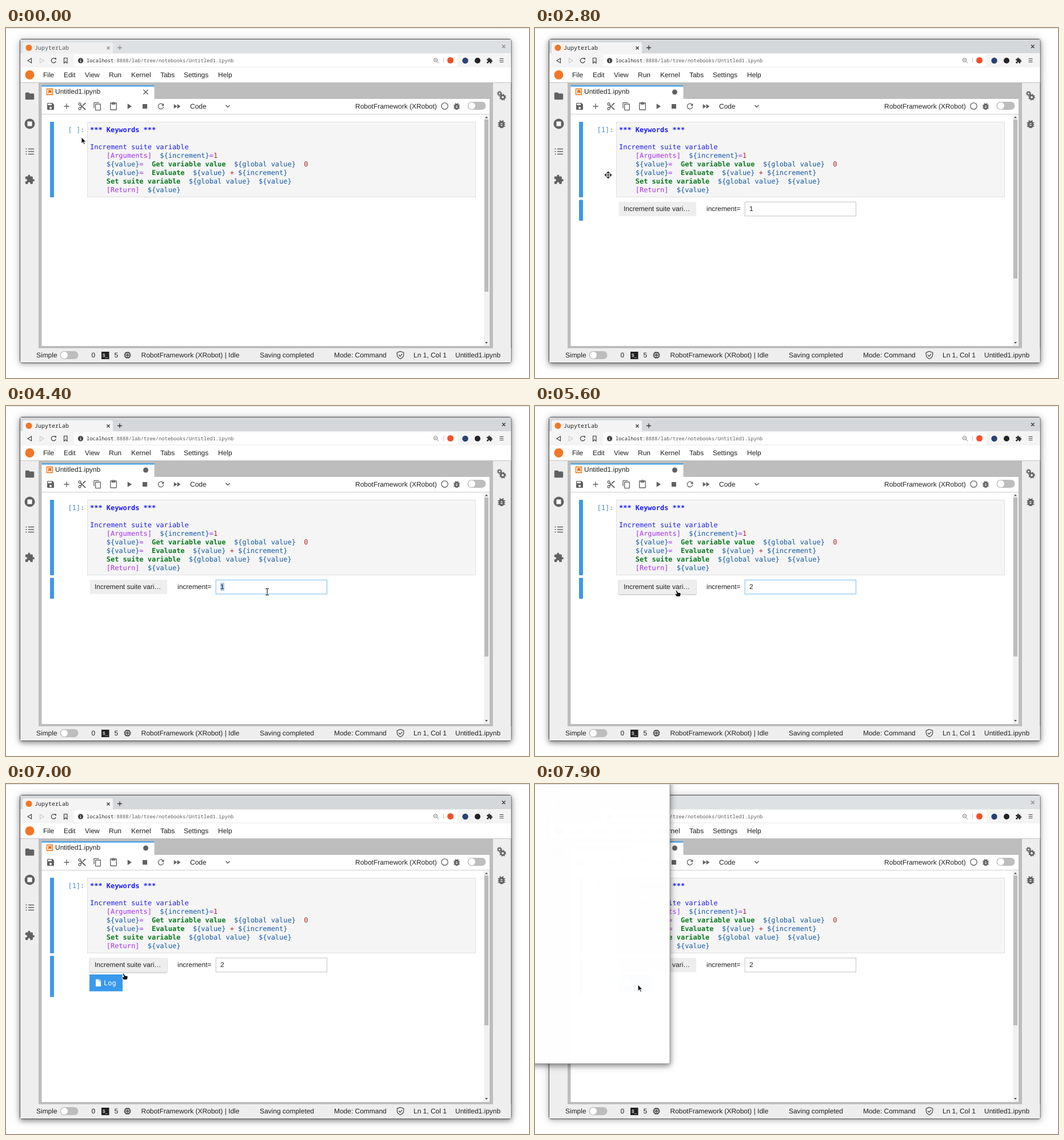
These frames come from a looping animation (915 px wide and 612 px high, 8000 ms). An HTML page:

```html
<!DOCTYPE html>
<html lang="en">
<head>
<meta charset="utf-8">
<title>Notebook widget demo</title>
<style>
html, body { margin: 0; width: 100%; height: 100%; overflow: hidden; background: #fff; }
svg { display: block; }
text { font: 11.96px "Liberation Sans", Arial, sans-serif; fill: #212121; white-space: pre; text-rendering: geometricPrecision; }
.code text, text.code { font-family: "DejaVu Sans Mono", monospace; }
text.chrome { font-family: "Noto Sans Mono", "DejaVu Sans Mono", monospace; }
.code .head { font-weight: bold; fill: #1a1aff; }
.code .name { fill: #2020e8; }
.code .meta { fill: #aa30f0; }
.code .var { fill: #1459a8; }
.code .key { font-weight: bold; fill: #0a7a1e; }
.code .lit { fill: #ba2121; }
.icon { fill: #616161; }
.line { fill: none; stroke: #424242; stroke-width: 1.2; }
.shade { filter: drop-shadow(0 3px 4.5px rgba(0,0,0,.36)) drop-shadow(0 1px 8px rgba(0,0,0,.2)); }
.shade.idle { filter: drop-shadow(0 2px 3px rgba(0,0,0,.2)) drop-shadow(0 1px 8px rgba(0,0,0,.2)); }
.lift { filter: drop-shadow(0 1px 1px rgba(0,0,0,.3)); }
#popup { filter: drop-shadow(0 3px 5px rgba(0,0,0,.4)) drop-shadow(0 1px 8px rgba(0,0,0,.2)); }
#cursor > g { display: none; }
</style>
</head>
<body>
<svg id="stage" width="915" height="612" viewBox="0 0 915 612">
  <!-- browser window -->
  <rect id="frame" class="shade" x="24.5" y="19.5" width="859.5" height="566" rx="3" fill="#eee" stroke="#4a4a4a"/>
  <rect id="titlebar" x="25" y="20" width="858.5" height="24"/>
  <path id="tab" d="M29 44V28q0-3 3-3H184q3 0 3 3V44z"/>
  <rect x="25" y="44" width="858.5" height="25" fill="#f4f4f4"/>
  <rect x="119" y="46" width="671" height="21" rx="3" fill="#fff"/>
  <circle cx="40" cy="34.5" r="5.5" fill="#f37726"/>
  <g id="controls">
    <text class="chrome" x="50" y="38" style="font-size:10px;font-weight:500;fill:inherit">JupyterLab</text>
    <path d="M176.5 32.5l5 5m0-5l-5 5M195 34.5h8m-4-4v8M868 29.500l5.500 5.500m0-5.500l-5.500 5.500" stroke-width="1.3"/>
  </g>
  <g class="line">
    <path d="M38 57l6.500-4v8z"/>
    <path d="M66 57l-6.500-4v8z" stroke="#ccc"/>
    <path d="M86.500 54.500a4 4 0 1 0 .7 3.500"/>
    <path d="M101.500 52.500h5.500v9l-2.750-2.500-2.750 2.500z"/>
    <path d="M863.500 53.500h7m-7 3h7m-7 3h7"/>
    <g stroke="#777" stroke-width="1">
      <circle cx="751.500" cy="56" r="3.200"/>
      <path d="M754 58.500l3 3M750 56h3"/>
    </g>
    <path d="M765.500 52v9" stroke="#ccc"/>
  </g>
  <path d="M84.500 52.500h3.500v3.500z" fill="#424242"/>
  <circle cx="130.500" cy="57" r="4.700" fill="#444"/>
  <path d="M130.500 54.300v1m0 1v3.400" stroke="#fff" stroke-width="1.200"/>
  <text class="chrome" x="141" y="60" style="font-size:8.750px;fill:#5c5c5c"><tspan fill="#222">localhost</tspan>:8888/lab/tree/notebooks/Untitled1.ipynb</text>
  <circle cx="777.500" cy="56.500" r="5.500" fill="#f4502a"/>
  <circle cx="803.500" cy="57" r="5.200" fill="#294172"/>
  <circle cx="825" cy="57" r="5" fill="#222"/>

  <!-- application shell -->
  <rect x="25" y="69" width="858.500" height="26" fill="#fff"/>
  <circle cx="41.500" cy="82" r="8" fill="#f37726"/>
  <g id="menu"></g>
  <rect x="57" y="95" width="795" height="465" fill="#bdbdbd"/>
  <rect x="25" y="95" width="858.500" height="1" fill="#c4c4c4"/>
  <rect x="62.500" y="101" width="197" height="24" fill="#fff"/>
  <rect x="62.500" y="100.500" width="197" height="1.800" fill="#2196f3"/>
  <rect x="62.500" y="124" width="783.500" height="432" fill="#fff"/>
  <rect x="62.500" y="150" width="783.500" height="1.300" fill="#d8d8d8"/>
  <path d="M71.500 106.500h10v10h-10z" fill="none" stroke="#ef6c00" stroke-width="1.300"/>
  <path d="M74 108.500h5.500v6.500l-2.750-2.500-2.750 2.500z" fill="#ef6c00"/>
  <text x="86" y="115">Untitled1.ipynb</text>
  <path id="close" d="M240.500 108l8 8m0-8l-8 8" stroke="#555" stroke-width="1.300"/>
  <circle id="dirty" cx="244.500" cy="112" r="4.500" fill="#616161"/>

  <g id="icons" class="icon"></g>
  <text x="322" y="141" fill="#111">Code</text>
  <path class="line" d="M384.500 135l3.500 3.500 3.500-3.500"/>
  <text x="611" y="141">RobotFramework (XRobot)</text>
  <circle id="kernel" cx="767.500" cy="136.500" r="5.700" fill="none" stroke="#616161" stroke-width="1.300"/>

  <!-- side bars -->
  <circle class="icon" cx="41.500" cy="167.500" r="9"/>
  <rect x="37.500" y="163.500" width="8" height="8" fill="#fff"/>
  <path d="M34.500 211.500h2m2.500 0h10M34.500 216h2m2.500 0h10M34.500 220.500h2m2.500 0h10" stroke="#616161" stroke-width="1.700"/>
  <g fill="none" stroke="#616161">
    <circle cx="863.500" cy="114.500" r="2.400" stroke-width="1.800"/>
    <circle cx="863.500" cy="114.500" r="3.700" stroke-width="1.500" stroke-dasharray="1.450"/>
    <circle cx="869" cy="121" r="3.300" stroke-width="2.500"/>
    <circle cx="869" cy="121" r="5" stroke-width="1.700" stroke-dasharray="1.963"/>
  </g>

  <!-- scroll bar -->
  <rect x="836" y="151.300" width="9.500" height="404.700" fill="#f1f1f1"/>
  <rect id="thumb" x="837" y="160" width="7" fill="#bcbcbc"/>
  <path d="M838 157.500h5l-2.500-3zM838 549h5l-2.500 3z" fill="#505050"/>

  <!-- notebook cell -->
  <rect x="77" y="164" width="7" height="132" rx="1" fill="#3c99e9"/>
  <text id="prompt" class="code" x="108.500" y="182" style="fill:#4d8dc5"></text>
  <rect x="142.500" y="164.500" width="679" height="131" fill="#f5f5f5" stroke="#e0e0e0"/>
  <g id="source" class="code"></g>

  <g id="output">
    <rect id="outbar" x="77" y="300.500" width="7" rx="1" fill="#3c99e9"/>
    <rect id="button" x="146.500" y="304" width="135.500" height="25"/>
    <text x="155" y="320">Increment suite vari…</text>
    <text x="300" y="320">increment=</text>
    <rect id="field" x="367.200" y="304.200" width="194.300" height="24.600" fill="#fff" stroke-width=".9"/>
    <rect id="mark" x="375" y="309" width="7" height="14" fill="#a9cdf0"/>
    <text id="value" x="375" y="320"></text>
    <rect id="caret" x="382" y="310" width="1" height="12" fill="#222"/>
    <g id="log">
      <rect id="logbox" x="146" y="333" width="58" height="29.500"/>
      <path d="M157 341.500h5.500v3.500h3.500v9h-9zM163.300 341.300l2.900 2.900h-2.900z" fill="#fff"/>
      <text class="code" x="171" y="352" style="fill:#fff">Log</text>
    </g>
  </g>

  <!-- status bar -->
  <rect x="25" y="560" width="858.500" height="25" fill="#eee"/>
  <g id="status"></g>
  <rect x="167" y="566" width="13.500" height="13" fill="#222"/>
  <text x="169" y="575" style="font-size:8px;fill:#fff">$_</text>
  <path class="line" d="M690 565.500l5.700 2v4q0 4.500-5.700 7-5.700-2.500-5.700-7v-4zM687 571.500l2.300 2.300 4-4"/>
  <g id="toggles"></g>

  <rect id="popup" x="-300" y="-60" fill="#fff" stroke="#777" stroke-width=".7"/>
  <rect width="915" height="1" fill="#dcdcdc"/>

  <g id="cursor" fill="#111" stroke="#fff" stroke-width=".9">
    <g id="arrow"><path d="M0 0V11l2.600-2.400 1.800 3.900 1.900-.9-1.800-3.700H8z"/></g>
    <g id="move">
      <circle r="4.300" fill="#fff" stroke="#111"/>
      <path d="M0-6.500l2.400 2.700h-4.800zM0 6.500l2.400-2.700h-4.800zM-6.500 0l2.700-2.400v4.800zM6.500 0l-2.700-2.400v4.800z" stroke="none"/>
      <path d="M-4 0H4M0-4V4" stroke="#111" stroke-width="1.100"/>
    </g>
    <g id="beam">
      <path d="M-3-5.500h2.200L0-5 .8-5.500H3M0-5V5M-3 5.500h2.200L0 5l.8.500H3" fill="none" stroke-width="2.600"/>
      <path d="M-3-5.500h2.200L0-5 .8-5.500H3M0-5V5M-3 5.500h2.200L0 5l.8.500H3" fill="none" stroke="#111" stroke-width="1.100"/>
    </g>
    <g id="hand"><path d="M-1.700 1Q-1-.8.4.6L2.200 4.100 6 4.500Q7.300 5 7 7.500L6 11.200H-.4L-3 7.400Q-3 5.800-1.500 6.300L0 6.800z"/></g>
  </g>
</svg>

<script>
const $ = id => document.getElementById(id);
const show = (id, on) => { $(id).style.display = on ? "inline" : "none"; };
const label = (x, y, s, id = "") => `<text x="${x}" y="${y}" id="${id}">${s}</text>`;

const shapes = {
  save: "M17 3H5c-1.100 0-2 .9-2 2v14c0 1.100.9 2 2 2h14c1.100 0 2-.9 2-2V7zM12 19a3 3 0 1 1 0-6 3 3 0 0 1 0 6zM15 9H5V5h10z",
  add: "M19 13h-6v6h-2v-6H5v-2h6V5h2v6h6z",
  cut: "M9.640 7.640A4 4 0 1 0 7.640 9.640L10 12l-2.360 2.360A4 4 0 1 0 9.640 16.360L12 14l7 7h3v-1zM6 8a2 2 0 1 1 0-4 2 2 0 0 1 0 4zm0 12a2 2 0 1 1 0-4 2 2 0 0 1 0 4zM19 3l-6 6 2 2 7-7V3z",
  copy: "M16 1H4a2 2 0 0 0-2 2v14h2V3h12zM19 5H8a2 2 0 0 0-2 2v14a2 2 0 0 0 2 2h11a2 2 0 0 0 2-2V7a2 2 0 0 0-2-2zm0 16H8V7h11z",
  paste: "M19 2h-4.200a3 3 0 0 0-5.600 0H5a2 2 0 0 0-2 2v16a2 2 0 0 0 2 2h14a2 2 0 0 0 2-2V4a2 2 0 0 0-2-2zm-7 0a1 1 0 1 1 0 2 1 1 0 0 1 0-2zm7 18H5V4h2v3h10V4h2z",
  play: "M7 5v14l11-7z",
  stop: "M6 6h12v12H6z",
  restart: "M12 18a6 6 0 1 1 4.200-10.200L13.300 10.700H20V4l-2.300 2.300A8 8 0 1 0 19.900 13.300h-2A6 6 0 0 1 12 18z",
  skip: "M4 18l8.500-6L4 6zM13 6v12l8.500-6z",
  folder: "M10 4H4a2 2 0 0 0-2 2v12a2 2 0 0 0 2 2h16a2 2 0 0 0 2-2V8a2 2 0 0 0-2-2h-8z",
  puzzle: "M20.500 11H19V7a2 2 0 0 0-2-2h-4V3.500a2.500 2.500 0 0 0-5 0V5H4a2 2 0 0 0-2 2v3.800h1.500a2.700 2.700 0 0 1 0 5.400H2V20a2 2 0 0 0 2 2h3.800v-1.500a2.700 2.700 0 0 1 5.400 0V22H17a2 2 0 0 0 2-2v-4h1.500a2.500 2.500 0 0 0 0-5z",
  bug: "M20 8h-2.800a6 6 0 0 0-1.800-2L17 4.400 15.600 3l-2.200 2.200a6 6 0 0 0-2.800 0L8.400 3 7 4.400 8.600 6a6 6 0 0 0-1.800 2H4v2h2v2H4v2h2v2H4v2h2.800a6 6 0 0 0 10.400 0H20v-2h-2v-2h2v-2h-2v-2h2zm-6 8h-4v-2h4zm0-4h-4v-2h4z",
  chip: "M15 9H9v6h6zm-2 4h-2v-2h2zm8-2V9h-2V7a2 2 0 0 0-2-2h-2V3h-2v2h-2V3H9v2H7a2 2 0 0 0-2 2v2H3v2h2v2H3v2h2v2a2 2 0 0 0 2 2h2v2h2v-2h2v2h2v-2h2a2 2 0 0 0 2-2v-2h2v-2h-2v-2zm-4 6H7V7h10z"
};
const icon = (name, x, y, size = 16) =>
  `<path d="${shapes[name]}" fill-rule="evenodd" transform="translate(${x - size / 2} ${y - size / 2}) scale(${size / 24})"/>`;

const tools = { save: 78, add: 106, cut: 133, copy: 160, paste: 188, play: 216, stop: 243, restart: 271, skip: 299 };
$("icons").innerHTML = Object.entries(tools).map(([n, x]) => icon(n, x, 137)).join("") +
  icon("bug", 788.5, 137) + icon("bug", 867, 168, 19) +
  icon("folder", 41.5, 119, 18.5) + icon("puzzle", 41.5, 265, 18.5);

const menu = { File: 65, Edit: 101, View: 138, Run: 180, Kernel: 219, Tabs: 270, Settings: 311, Help: 371 };
$("menu").innerHTML = Object.entries(menu).map(([s, x]) => label(x, 86, s)).join("") +
  `<g fill="#333">${icon("puzzle", 846, 57, 11.5)}</g>`;

$("status").innerHTML = [
  [53, "Simple"], [149.5, "0"], [189.5, "5"], [236.5, "", "state"], [444, "Saving completed"],
  [574, "Mode: Command"], [713, "Ln 1, Col 1"], [786, "Untitled1.ipynb"]
].map(([x, s, id]) => label(x, 575.5, s, id)).join("");
$("toggles").innerHTML = [[807.5, 136], [94.5, 572]].map(([x, y]) =>
  `<rect x="${x}" y="${y - 7}" width="32" height="14" rx="7" fill="#bdbdbd"/><circle cx="${x + 7.5}" cy="${y}" r="6" fill="#fff"/>`
).join("") + `<g fill="#333">${icon("chip", 212.5, 572, 16)}</g>`;

// Each token is "style|text"; tokens are joined as they stand.
const source = [
  ["head|*** Keywords ***"],
  [],
  ["name|Increment suite variable"],
  ["meta|    [Arguments]", "var|  ${increment}", "meta|=", "lit|1"],
  ["var|    ${value}", "meta|=", "key|  Get variable value", "var|  ${global value}", "lit|  0"],
  ["var|    ${value}", "meta|=", "key|  Evaluate", "var|  ${value}", "lit| + ", "var|${increment}"],
  ["key|    Set suite variable", "var|  ${global value}  ${value}"],
  ["meta|    [Return]", "var|  ${value}"]
];
$("source").innerHTML = source.map((row, i) => label(147, 182 + i * 15.04, row.map(token => {
  const [style, s] = token.split("|");
  return `<tspan class="${style}">${s}</tspan>`;
}).join(""))).join("");

// Pointer steps: time, x, y, shape.
const path = [
  [0, 132, 191, "arrow"],
  [200, 131, 200, "move"], [300, 131, 212, "move"], [400, 130, 226, "move"], [500, 129, 238, "move"],
  [600, 128, 247, "move"], [700, 128, 254, "move"], [800, 128, 257, "move"],
  [3700, 185, 292, "beam"], [3800, 300, 345, "arrow"], [3900, 420, 379, "arrow"],
  [4000, 476, 366, "arrow"], [4100, 457, 325, "beam"],
  [5200, 448, 327, "beam"], [5300, 410, 327, "beam"], [5400, 345, 336, "arrow"], [5500, 286, 332, "arrow"],
  [5600, 248, 322, "hand"], [5700, 230, 314, "hand"], [5800, 224, 312, "hand"],
  [6800, 221, 316, "hand"], [6900, 213, 324, "hand"], [7000, 206, 331, "hand"], [7100, 199, 337, "hand"],
  [7200, 191, 343, "hand"], [7300, 185, 348, "hand"], [7400, 182, 350, "hand"], [7500, 180, 351, "hand"],
  [7800, 180, 351, "arrow"]
];

const LOOP = 8000;
let last = -1;

function draw(t) {
  const within = (a, b = LOOP) => t >= a && t < b;
  const [, x, y, shape] = path.findLast(p => p[0] <= t);
  $("cursor").setAttribute("transform", `translate(${x} ${y})`);
  for (const s of ["arrow", "move", "beam", "hand"]) show(s, s === shape);

  const active = within(200, 7800);
  $("frame").setAttribute("class", active ? "shade" : "shade idle");
  $("titlebar").style.fill = active ? "#d5d8da" : "#dee1e4";
  $("tab").style.fill = active ? "#f4f4f4" : "#efefef";
  $("controls").style.fill = active ? "#222" : "#555";
  $("controls").lastElementChild.style.stroke = active ? "#333" : "#888";

  const ran = t >= 2800, logged = t >= 6400, busy = within(6300, 6400);
  show("close", !ran);
  show("dirty", ran);
  show("output", ran);
  show("log", logged);
  $("prompt").textContent = ran ? "[1]:" : "[ ]:";
  $("thumb").setAttribute("height", logged ? 262 : ran ? 278 : 301);
  $("outbar").setAttribute("height", logged ? 72 : 36.5);

  const pressed = within(6100, 6300);
  $("button").style.stroke = pressed ? "#64b5f6" : "none";
  $("button").style.fill = pressed ? "#e8e8e8" : "#eee";
  $("button").setAttribute("class", within(5600, 7100) ? "lift" : "");
  $("logbox").style.fill = within(7700, 7800) ? "#2a86d6" : "#3999ec";
  $("field").style.stroke = within(4300, 6100) ? "#64b5f6" : "#bdbdbd";
  $("value").textContent = t < 5100 ? "1" : "2";
  show("mark", within(4400, 5100));
  show("caret", within(4300, 4400) || within(5100, 5600));

  $("kernel").style.fill = busy ? "#616161" : "none";
  $("state").textContent = "RobotFramework (XRobot) | " + (busy ? "Busy" : "Idle");

  // The new window fades and grows in within two steps.
  const open = t >= 7900;
  show("popup", t >= 7800);
  $("popup").setAttribute("width", open ? 536 : 500);
  $("popup").setAttribute("height", open ? 549 : 510);
  $("popup").style.opacity = open ? .99 : .5;
}

function tick() {
  const t = Math.floor(performance.now() % LOOP / 100) * 100;
  if (t !== last) draw(last = t);
  requestAnimationFrame(tick);
}
tick();
</script>
</body>
</html>
```
